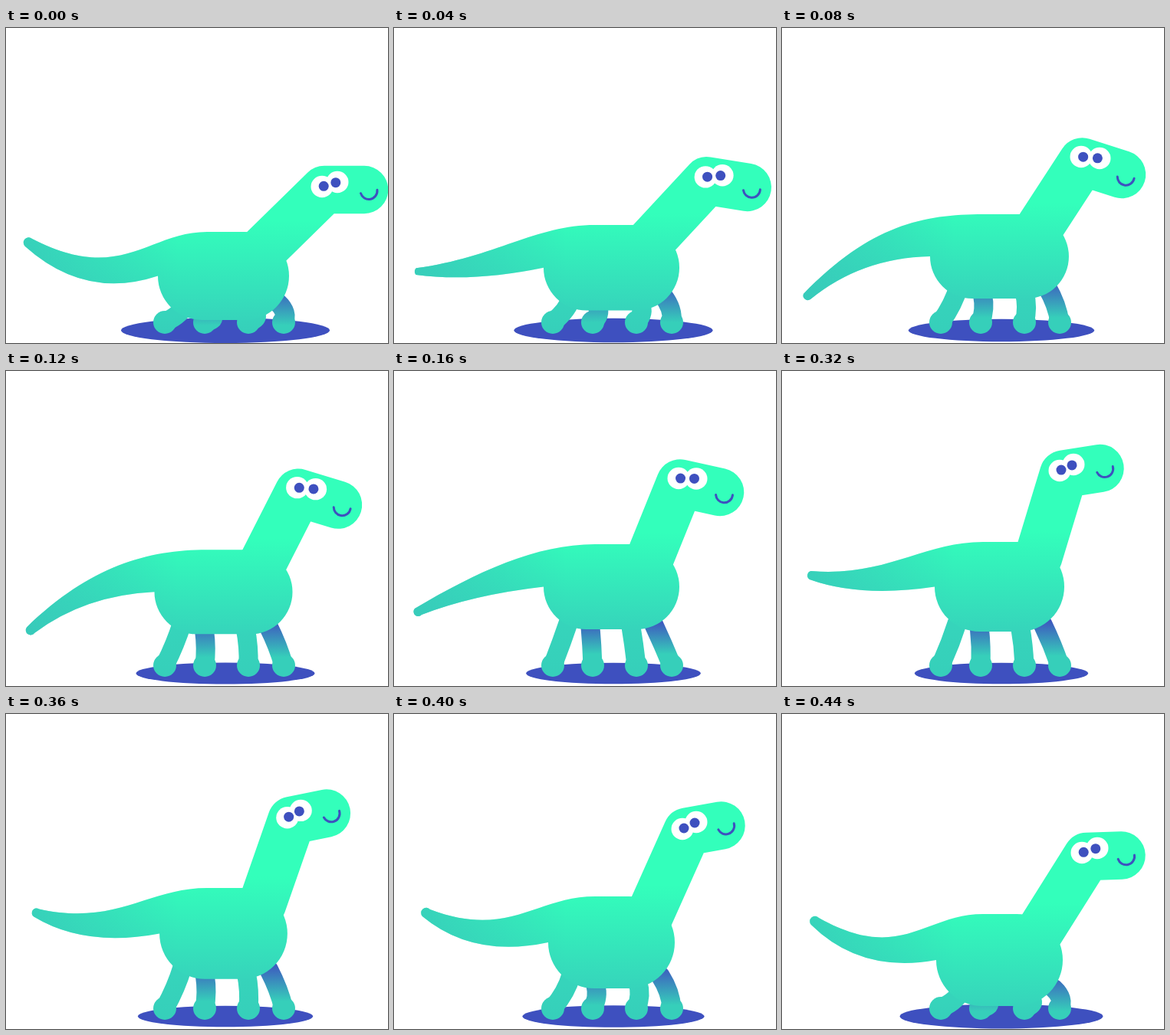
Write an HTML page with a canvas that moves like this. It is 498 by 411 pixels and loops after 480 ms.

```html
<!DOCTYPE html>
<html lang="en">
<head>
<meta charset="utf-8">
<title>Bouncing dinosaur</title>
<style>
  html, body { margin: 0; height: 100%; overflow: hidden; background: #fff; }
  canvas { display: block; }
</style>
</head>
<body>
<canvas width="498" height="411"></canvas>
<script>
const ctx = document.querySelector('canvas').getContext('2d');
const LOOP = 480, STEP = 40;
const BLUE = '#3e50bf', MINT = '#33ffbb', TEAL = '#36d4bb', FOOT = '#36cfba';

// Pose: body top, bottom, left | tail tip top x y, top control x y, tip bottom x y, bottom control y
//       | nape x y, muzzle x y | eye offsets from nape: left x y, right x y (one value shared per eye axis)
const times = [0, 80, 160, 240, 320, 400, 440];
const poses = [
  [266, 381, 198, 34, 275, 150, 335, 25, 285, 355, 415, 211, 467, 211, -3, -4, 17, -10],
  [243, 353, 193, 28, 347, 115, 257, 37, 354, 300, 391.5, 174.5, 443, 191, -1.5, -6.5, 22.5, -4.5],
  [226, 337, 195, 27, 310, 108, 262, 36, 318, 292, 373, 146.5, 425, 158, -2, -6.5, 21, -6],
  [222, 336, 198, 30, 286, 103, 265, 36, 295, 291, 367, 137, 418, 137, -4, -6, 16, -10],
  [223, 340, 199, 38, 261, 135, 269, 36, 272, 296, 367, 134.5, 414.5, 127, -5, -4.5, 13, -12.5],
  [238, 358, 201, 47, 255, 150, 294, 37, 264, 319, 382, 153.5, 426.5, 145.5, -6, -3.5, 12, -12.5],
  [261, 381, 201, 48, 266, 155, 326, 38, 275, 339, 397.5, 186, 442.5, 184.5, -6.5, -5, 13.5, -11]
];

const count = poses.length;
const poseAt = i => poses[(i + count) % count];
const timeAt = i => times[(i + count) % count] + LOOP * Math.floor(i / count);

// Slope through a key, weighted for uneven spacing
function slope(i, j) {
  const before = timeAt(i) - timeAt(i - 1), after = timeAt(i + 1) - timeAt(i);
  const v = poseAt(i)[j];
  const a = (v - poseAt(i - 1)[j]) / before, b = (poseAt(i + 1)[j] - v) / after;
  return (a * after + b * before) / (before + after);
}

function sample(t) {
  let i = 0;
  while (timeAt(i + 1) <= t) i++;
  const span = timeAt(i + 1) - timeAt(i), u = (t - timeAt(i)) / span;
  const u2 = u * u, u3 = u2 * u;
  return poseAt(i).map((v, j) =>
    v * (2 * u3 - 3 * u2 + 1) + poseAt(i + 1)[j] * (3 * u2 - 2 * u3) +
    span * (slope(i, j) * (u3 - 2 * u2 + u) + slope(i + 1, j) * (u3 - u2)));
}

function gradient(x0, y0, x1, y1, from, to) {
  const g = ctx.createLinearGradient(x0, y0, x1, y1);
  g.addColorStop(0, from);
  g.addColorStop(1, to);
  return g;
}

function ellipse(x, y, rx, ry, color) {
  ctx.fillStyle = color;
  ctx.beginPath();
  ctx.ellipse(x, y, rx, ry, 0, 0, 2 * Math.PI);
  ctx.fill();
}

function stroke(path, width, style) {
  ctx.lineWidth = width;
  ctx.strokeStyle = style;
  ctx.stroke(new Path2D(path));
}

function leg(hipX, hipY, footX, bend, style) {
  const kneeX = (hipX + footX) / 2 + 10 * bend, kneeY = (hipY + 384) / 2;
  stroke(`M${hipX} ${hipY} Q${kneeX} ${kneeY} ${footX} 384`, 25, style);
  ellipse(footX, 384, 15, 15, style);
}

function draw(t) {
  const [top, bottom, left, tipX, tipY, curlX, curlY, endX, endY, sagY,
    napeX, napeY, headX, headY, lx, ly, rx, ry] = sample(t);
  const right = 567 - left, r = (bottom - top) / 2;
  const crouch = Math.max(0, (bottom - 336) / 45) ** 0.7;
  const skin = gradient(0, top - 15, 0, bottom, MINT, TEAL);

  ctx.clearRect(0, 0, 498, 411);
  ctx.lineCap = ctx.lineJoin = 'round';

  const shadow = 113 + 23 * Math.max(0, (top - 222) / 44) ** 1.4;
  ellipse(286, 394.5, shadow, shadow * 0.121, BLUE);

  const far = gradient(0, bottom - 10 - 35 * crouch, 0, 368 + 20 * crouch, BLUE, FOOT);
  leg(255 + 13 * crouch, bottom - 4, 259, crouch, far);
  leg(337 + 17 * crouch, bottom - 6 - 17 * crouch, 362, crouch, far);
  const near = gradient(0, bottom - 5, 0, 398, TEAL, FOOT);
  leg(229 + 3 * crouch, bottom - 14 - 5 * crouch, 207, crouch, near);
  leg(307 + 18 * crouch, bottom - 8, 316, crouch, near);

  const torso = new Path2D(`M${left} ${bottom - r} Q103 ${sagY} ${endX} ${endY}
    A6 6 0 0 1 ${tipX} ${tipY} C${curlX} ${curlY} 185 ${top} 262 ${top}
    H${right - r} A${r} ${r} 0 0 1 ${right - r} ${bottom}
    H${left + r} A${r} ${r} 0 0 1 ${left} ${bottom - r}Z`);
  ctx.fillStyle = skin;
  ctx.fill(torso);
  ctx.fillStyle = gradient(225, 0, 30, 0, 'rgba(56,200,186,0)', 'rgba(56,200,186,.8)');
  ctx.fill(torso);

  const baseY = top + 10 + 12 * crouch;
  const neck = Math.atan2(napeY - baseY, napeX - 336.5);
  stroke(`M${336.5 - 8 * Math.cos(neck)} ${baseY - 8 * Math.sin(neck)}
    L${napeX} ${napeY} L${headX} ${headY}`, 62.5, skin);

  const eyes = [[lx, ly, rx, ry], [rx, ry, lx, ly]];
  for (const [x, y] of eyes) ellipse(napeX + x, napeY + y, 14.5, 14.2, '#fff');
  for (const [x, y, otherX, otherY] of eyes) {
    ellipse(napeX + x + (otherX - x) * 0.11, napeY + y + (otherY - y) * 0.11, 6.5, 6.5, BLUE);
  }

  ctx.save();
  ctx.translate(headX, headY);
  ctx.rotate(Math.atan2(headY - napeY, headX - napeX));
  ctx.beginPath();
  ctx.arc(6, 1.5, 11, -0.12, 2.85);
  ctx.lineWidth = 3;
  ctx.strokeStyle = BLUE;
  ctx.stroke();
  ctx.restore();
}

const start = performance.now();
function tick() {
  const t = (performance.now() - start) % LOOP;
  draw(Math.floor(t / STEP) * STEP);
  requestAnimationFrame(tick);
}
tick();
</script>
</body>
</html>
```
